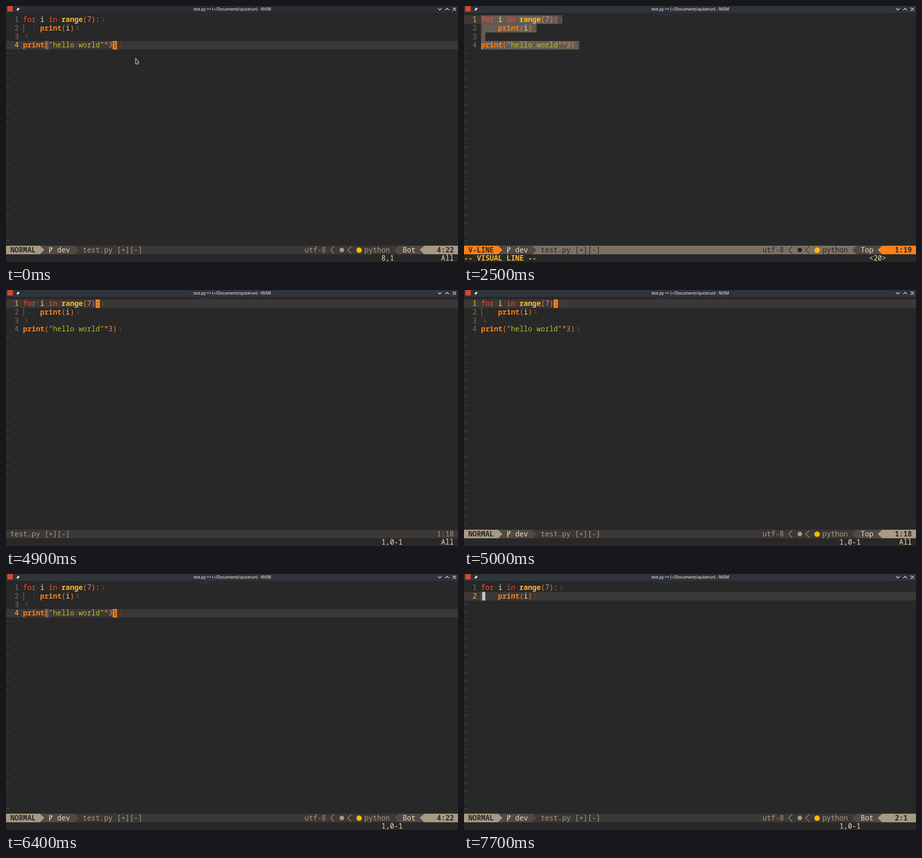
Animation, 994 px wide and 563 px high, one loop 8000 ms. Source, as an HTML page:

```html
<!DOCTYPE html>
<html lang="en">
<head>
<meta charset="utf-8">
<title>Editor</title>
<style>
html, body { margin: 0; height: 100%; overflow: hidden; background: #282828; }
svg { display: block; width: 994px; height: 563px; }
text { white-space: pre; font: 15.633px "Noto Sans Mono", "DejaVu Sans Mono", monospace; }
.b { font-weight: 700; }
.title { font: 8.67px "Noto Sans", "Open Sans", sans-serif; text-anchor: middle; }
</style>
</head>
<body>
<svg id="stage" viewBox="0 0 994 563"></svg>
<script>
const CW = 9.38, RH = 18.76, TOP = 20.7, STATUS = 27, CMD = 28, LOOP = 8000;
const bg = '#282828', bg1 = '#3c3836', bg2 = '#504945', bg3 = '#665c54', bg4 = '#7c6f64',
  fg = '#ebdbb2', fg4 = '#a89984', red = '#fb4934', orange = '#fe8019', yellow = '#fabd2f',
  green = '#b8bb26', purple = '#d3869b', block = '#c5c8c6';

// Each line is a list of [text, colour, bold]
const code = [
  [['for', red], [' i ', fg], ['in', red], [' ', fg], ['range', yellow, 1], ['(', orange],
    ['7', purple], ['):', orange]],
  [['    ', fg], ['print', orange, 1], ['(', orange], ['i', fg], [')', orange]],
  [],
  [['print', orange, 1], ['(', orange], ['"hello world"', green], ['*', orange], ['3', purple], [')', orange]]
];
const plain = code.map(parts => parts.map(p => p[0]).join(''));

// Each step changes only the listed parts of the state
const steps = [
  [0, { bar: '#2a2e32', rows: 4, pos: '4:22', pct: 'Bot', mode: 'NORMAL', ruler: '8,1', all: 1,
    mouse: 1, visual: 0, keys: '', popup: 0 }],
  [500, { bar: '#2f343a' }],
  [1100, { mouse: 0, visual: 1, ruler: '', all: 0, keys: '1' }],
  [1200, { mode: 'V-LINE' }],
  [1300, { pos: '4:23' }],
  [1500, { pos: '3:1', pct: '75%', keys: '2' }],
  [1700, { pos: '2:13', pct: '50%', keys: '3' }],
  [1900, { pos: '1:19', pct: 'Top', keys: '4' }],
  [2500, { keys: '&lt;20>' }],
  [2900, { popup: 1, visual: 0, mode: '', pos: '1:18', ruler: '1,0-1', all: 1, keys: '' }],
  [4900, { popup: 0 }],
  [5000, { mode: 'NORMAL' }],
  [6100, { pos: '2:12', pct: '50%', all: 0 }],
  [6200, { pos: '3:1', pct: '75%' }],
  [6400, { pos: '4:22', pct: 'Bot' }],
  [6700, { keys: 'd' }],
  [6800, { rows: 3, pos: '3:1', keys: '' }],
  [7500, { keys: 'd' }],
  [7700, { rows: 2, pos: '2:1', keys: '' }]
];

const rect = (x, y, w, h, c) => `<rect x="${x}" y="${y}" width="${w}" height="${h}" fill="${c}"/>`;
const line = (d, c, w = 1.2) => `<path d="${d}" fill="none" stroke="${c}" stroke-width="${w}"/>`;
const fill = (d, c) => `<path d="${d}" fill="${c}"/>`;
const disc = (x, y, r, c) => `<circle cx="${x}" cy="${y}" r="${r}" fill="${c}"/>`;
const rowY = row => TOP + row * RH;
const cells = (col, row, n, c, rows = 1) => rect(col * CW, rowY(row), n * CW, rows * RH, c);
const text = (col, row, s, c, bold) =>
  `<text x="${col * CW}" y="${rowY(row) + 14.4}" fill="${c}"${bold ? ' class="b"' : ''}>${s}</text>`;
const eol = (col, row, c = bg2) =>
  line(`M${col * CW + 3.5} ${rowY(row) + 5.5}h4.5v6.5m-2.5 -2.5l2.5 3l2.5 -3`, c);
const tildes = (col, from, to) => {
  let out = '';
  for (let r = from; r <= to; r++) out += text(col, r, '~', bg2);
  return out;
};

function spaced(col, row, parts) {
  let out = '';
  for (const [s, c, bold] of parts) {
    out += text(col, row, s, c, bold);
    [...s].forEach((ch, i) => { if (ch === ' ') out += text(col + i, row, '·', bg2); });
    col += s.length;
  }
  return out;
}

function titleBar(s) {
  const name = s.popup ? '[No Name] - NVIM' : 'test.py =+ (~/Documents/quickrun) - NVIM';
  return rect(0, 0, 994, 15, s.bar) + rect(426, 18, 26, 1.3, '#323c66') +
    rect(3, 0, 12, 12, '#cf4a2e') +
    fill('M26 2.5l4 4l-1.2 .4l-1.8 1.8l-.3 2l-1.7 -1.7l-2.7 2.5l2.2 -3l-1.7 -1.7l2 -.3l1.8 -1.8z', '#fcfcfc') +
    `<text class="title" x="497.5" y="10" fill="#fcfcfc">${name}</text>` +
    line('M950 5l4 4l4 -4M966 9l4 -4l4 4M982.5 3.5l7 7m0 -7l-7 7', '#fcfcfc', 1.1);
}

function editor(s) {
  const [ln, column] = s.pos.split(':').map(Number), row = ln - 1, col = column + 3;
  const src = plain[row], ch = src[column - 1];
  let out = cells(0, row, s.visual ? 4 : 107, bg1);
  if (s.visual)
    for (let r = row; r < s.rows; r++) out += cells(4, r, plain[r].length + 1, bg3);
  if (!s.popup && ch === ')') out += cells(4 + src.lastIndexOf('('), row, 1, bg3);
  for (let r = 0; r < s.rows; r++) {
    out += text(2, r, r + 1, r === row ? yellow : bg4) + spaced(4, r, code[r]) +
      eol(4 + plain[r].length, r);
    if (r === 1) out += cells(4, 1, 1, s.visual && row < 2 ? bg3 : r === row ? bg1 : bg);
  }
  if (!s.popup) {
    const solid = ch && ch !== ' ';
    out += cells(col, row, 1, solid ? orange : s.visual ? bg2 : block);
    if (solid) out += text(col, row, ch, bg);
    else if (!ch) out += eol(col, row, s.visual ? bg3 : bg);
  }
  return out + rect(4 * CW, rowY(1), 2.6, RH, bg2) + tildes(0, s.rows, 26);
}

function popup() {
  let out = cells(13, 2, 80, bg1, 24) + cells(17, 2, 1, block) + eol(17, 2, bg);
  for (let i = 0; i < 9; i++) {
    out += text(15, 2 + i, i + 1, i ? bg4 : yellow);
    if (i && i < 8) out += text(17, 2 + i, i - 1, fg) + eol(18, 2 + i);
  }
  out += text(17, 10, 'hello worldhello worldhello world', fg) + eol(50, 10);
  for (const c of [23, 34]) out += rect(c * CW, rowY(10) + 16, 10 * CW, 1, fg);
  return out + tildes(13, 11, 25);
}

function statusLine(s) {
  const y = rowY(STATUS), mid = y + RH / 2, put = (c, str, color, bold) => text(c, STATUS, str, color, bold);
  const wedge = (c, dir, color) => {
    const x = (dir > 0 ? c : c + 1) * CW;
    return fill(`M${x} ${y}l${dir * CW} ${RH / 2}l${-dir * CW} ${RH / 2}z`, color);
  };
  if (!s.mode)
    return cells(0, STATUS, 107, bg1) + put(1, 'test.py [+][-]', fg4) + put(101, s.pos, fg4);
  const vis = s.mode === 'V-LINE', main = vis ? orange : fg4, base = vis ? bg4 : bg1, ink = vis ? bg : fg4;
  const chevron = c => line(`M${(c + 1) * CW - .5} ${y + 1.5}L${c * CW + .8} ${mid}L${(c + 1) * CW - .5} ${y + RH - 1.5}`, ink);
  return cells(0, STATUS, 107, base) +
    cells(0, STATUS, 16, bg2) + wedge(16, 1, bg2) +
    cells(0, STATUS, 8, main) + wedge(8, 1, main) + put(1, s.mode, bg, 1) +
    line(`M96 ${y + 2}v14.5m0 -3.5q0 -2 2.3 -3q2.2 -1 2.2 -3.5v-2`, fg, 1.6) +
    fill(`M98 ${y + 6}h5l-2.5 -3.5z`, fg) +
    put(12, 'dev', fg) + put(18, 'test.py [+][-]', ink) +
    put(70, 'utf-8', ink) + chevron(76) + disc(738.5, mid, 5, ink) + chevron(80) +
    disc(776.5, mid + .5, 6, '#ffbc03') + put(84, 'python', ink) +
    wedge(91, -1, bg2) + cells(92, STATUS, 15, bg2) + put(93, s.pct, fg) +
    wedge(97, -1, main) + cells(98, STATUS, 9, main) + put(101, s.pos, bg, 1);
}

function commandLine(s) {
  return (s.visual ? text(0, CMD, '-- VISUAL LINE --', yellow, 1) : '') +
    text(88, CMD, s.ruler, fg) + text(95, CMD, s.keys, fg) + (s.all ? text(102, CMD, 'All', fg) : '');
}

const pointer = '<path d="M285 114.5v12.5h3l2 1.5l1 -2.5l-.5 -2h2z" fill="#31363b" stroke="#fcfcfc"/>';

const stage = document.getElementById('stage');
let shown = -1;
function draw(now) {
  const t = now % LOOP;
  const index = steps.filter(([at]) => at <= t).length - 1;
  if (index !== shown) {
    shown = index;
    const s = Object.assign({}, ...steps.slice(0, index + 1).map(step => step[1]));
    stage.innerHTML = rect(0, 0, 994, 563, bg) + titleBar(s) + editor(s) + (s.popup ? popup() : '') +
      statusLine(s) + commandLine(s) + (s.mouse ? pointer : '');
  }
  requestAnimationFrame(draw);
}
draw(performance.now());
</script>
</body>
</html>
```
